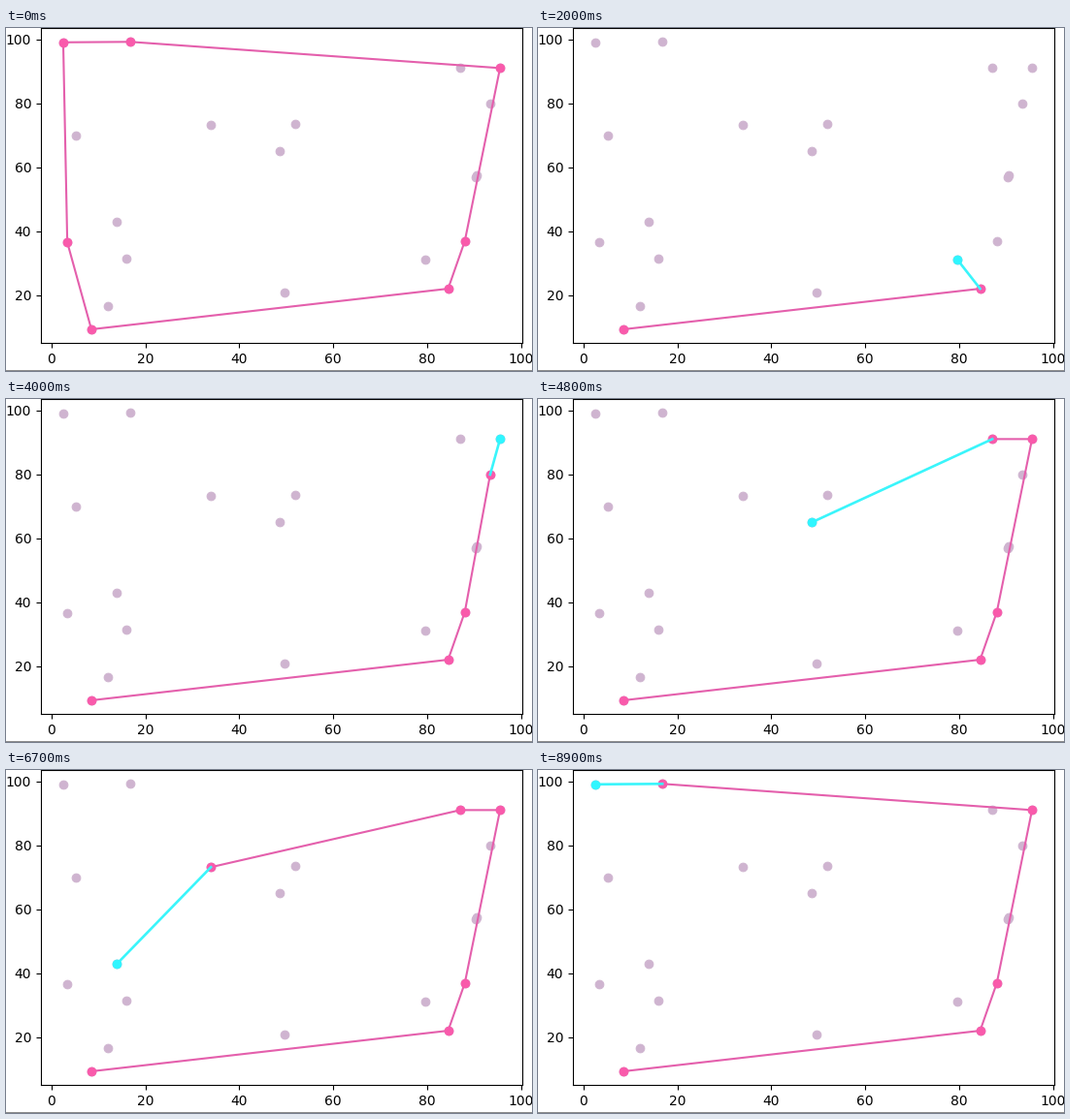
Animation of 542x354 px, one loop 9000 ms. Source, as a matplotlib script:

```python
import math

import matplotlib.pyplot as plt
import numpy as np
from matplotlib.animation import FuncAnimation
from matplotlib.lines import Line2D

W, H, DPI = 542, 354, 100
STEP_MS, FRAMES = 100, 90

PALE, PINK, PINK_LINE = "#cfb4d0", "#f95aab", "#e45fac"
CYAN, CYAN_LINE = "#2ff6ff", "#3af5fb"

POINTS = [
    (8.5, 9.4), (84.45, 22.1), (49.7, 20.9), (79.6, 31.2), (88.0, 37.0),
    (90.35, 56.9), (90.55, 57.5), (93.4, 80.0), (95.5, 91.1), (87.05, 91.1),
    (48.6, 65.05), (51.9, 73.55), (12.05, 16.6), (33.95, 73.25), (16.0, 31.4),
    (13.9, 42.95), (16.8, 99.3), (5.23, 69.9), (2.5, 99.15), (3.37, 36.6),
]


def turn(a, b, c):
    return (b[0] - a[0]) * (c[1] - b[1]) - (b[1] - a[1]) * (c[0] - b[0])


def graham_scan(points):
    """Return every (stack, candidate) step and the finished hull."""
    base = min(points, key=lambda p: p[1])
    rest = sorted((p for p in points if p != base),
                  key=lambda p: math.atan2(p[1] - base[1], p[0] - base[0]))
    stack, steps = [base, rest[0]], []
    for p in rest[1:]:
        steps.append((stack[:], p))
        while turn(stack[-2], stack[-1], p) <= 0:
            stack.pop()
            steps.append((stack[:], p))
        stack.append(p)
    return steps, stack


# The last candidate closes the hull, so its own step is not shown.
steps, hull = graham_scan(POINTS)
steps = steps[:-1]

# The scan runs evenly between a few changes of pace (step, frame).
PACE = [(0, 14), (11, 41), (13, 48), (19, 58), (22, 66), (29, 86)]
starts = np.interp(range(len(steps)), *zip(*PACE))

fig = plt.figure(figsize=(W / DPI, H / DPI), dpi=DPI, facecolor="white")
ax = fig.add_axes([36 / W, 29 / H, 496 / W, 325 / H])
ax.set_xlim(-2.24, 100.24)
ax.set_ylim(5.15, 103.63)
ax.set_xticks(range(0, 101, 20))
ax.set_yticks(range(20, 101, 20))
ax.tick_params(labelsize=10, labelfontfamily="DejaVu Sans")

# Thin window edge along the bottom.
fig.add_artist(Line2D([0, 1], [1 / H] * 2, color="#8c8c8c", lw=0.72))


def dots(color, z):
    return ax.plot([], [], "o", color=color, ms=6.4, mew=0.6, zorder=z)[0]


def path(color, width, z):
    return ax.plot([], [], color=color, lw=width, zorder=z)[0]


all_dots = dots(PALE, 2)
hull_line, hull_dots = path(PINK_LINE, 1.5, 3), dots(PINK, 4)
probe_line, probe_dot = path(CYAN_LINE, 1.9, 5), dots(CYAN, 6)
all_dots.set_data(*zip(*POINTS))


def draw(frame):
    done = int(np.sum(starts <= frame))
    if done:
        stack, p = steps[done - 1]
        hull_line.set_data(*zip(*stack))
        probe_line.set_data(*zip(stack[-1], p))
        probe_dot.set_data([p[0]], [p[1]])
    else:
        stack = hull
        hull_line.set_data(*zip(*hull, hull[0]))
        probe_line.set_data([], [])
        probe_dot.set_data([], [])
    hull_dots.set_data(*zip(*stack))
    return hull_line, hull_dots, probe_line, probe_dot


anim = FuncAnimation(fig, draw, frames=FRAMES, interval=STEP_MS,
                     repeat=True, repeat_delay=0)
plt.show()
```
